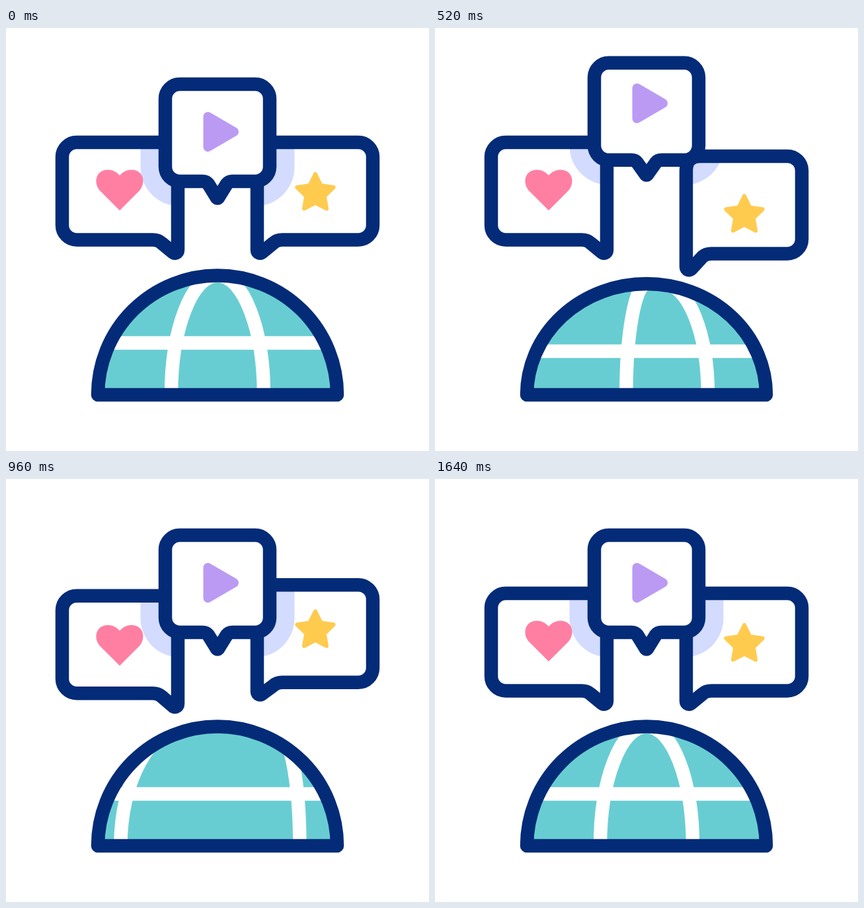
An HTML page with a canvas that plays this animation: 640x640 px, repeating every 2 s.

```html
<!DOCTYPE html>
<html lang="en">
<head>
<meta charset="utf-8">
<title>Global media</title>
<style>
  html, body { margin: 0; width: 100%; height: 100%; overflow: hidden; background: #fff; }
  canvas { display: block; width: 640px; height: 640px; }
</style>
</head>
<body>
<canvas id="stage" width="640" height="640"></canvas>
<script>
const ctx = document.getElementById('stage').getContext('2d');
const LOOP = 2000;
const LINE = 20.5;
const NAVY = '#042b77', TEAL = '#68cdd2', SHADE = '#d3dcff';
const PINK = '#ff7fa3', YELLOW = '#ffcb4f', VIOLET = '#bb9af3';

// Keys are [time, value] pairs, eased in and out between neighbours.
function track(keys, t) {
  if (t <= keys[0][0]) return keys[0][1];
  for (let i = 1; i < keys.length; i++) {
    const [t0, v0] = keys[i - 1], [t1, v1] = keys[i];
    if (t < t1) {
      const p = (t - t0) / (t1 - t0);
      return v0 + (v1 - v0) * p * p * (3 - 2 * p);
    }
  }
  return keys[keys.length - 1][1];
}

// Smooth curve through all keys, at rest at both ends.
function spline(keys, t) {
  const last = keys.length - 1;
  if (t <= keys[0][0]) return keys[0][1];
  if (t >= keys[last][0]) return keys[last][1];
  const slope = i => i === 0 || i === last ? 0
    : (keys[i + 1][1] - keys[i - 1][1]) / (keys[i + 1][0] - keys[i - 1][0]);
  let i = 0;
  while (t >= keys[i + 1][0]) i++;
  const [t0, v0] = keys[i], [t1, v1] = keys[i + 1];
  const d = t1 - t0, p = (t - t0) / d, q = 1 - p;
  return v0 * (1 + 2 * p) * q * q + v1 * p * p * (3 - 2 * p)
    + d * p * q * (slope(i) * q - slope(i + 1) * p);
}

const SPIN = [[320, 0], [520, 39], [680, 91], [960, 194], [1320, 352], [1640, 411]];
const SQUASH = [[0, 0], [280, -10.5], [320, -10.5], [520, 12.5], [680, 0]];

// Each bubble dips, hops and settles; tail and icon travel further than the body.
const hops = {
  center: { times: [0, 280, 320, 560, 800], body: [32, -37], tail: [39, -40.5], icon: [48, -50] },
  right: { times: [360, 600, 600, 840, 1080], body: [28, -26], tail: [34, -29], icon: [44.5, -42] },
  left: { times: [600, 840, 840, 1120, 1400], body: [22, -24], tail: [24.5, -26.5], icon: [32, -32] }
};

function hop(name, t) {
  const { times, ...parts } = hops[name];
  const pose = {};
  for (const key in parts) {
    const [down, up] = parts[key];
    const values = [0, down, down, up, 0];
    pose[key] = track(times.map((time, i) => [time, values[i]]), t);
  }
  return pose;
}

function sidePath({ body, tail }) {
  const top = 173 + body, base = 320.5 + body;
  return new Path2D(`M107 ${top} H238 Q260 ${top} 260 ${top + 22} V${336 + tail}
    C260 ${341 + tail} 255 ${342 + tail} 252 ${339 + tail}
    L235 ${325 + body} Q230 ${base} 222 ${base} H107
    A22 22 0 0 1 85 ${base - 22} V${top + 22} A22 22 0 0 1 107 ${top} Z`);
}

function centerPath({ body, tail }) {
  const top = 85 + body, base = 232 + body, tip = 257.5 + tail;
  return new Path2D(`M263 ${top} H377 A22 22 0 0 1 399 ${top + 22} V${base - 22}
    A22 22 0 0 1 377 ${base} H343 Q337 ${base} 334 ${base + 4}
    L321 ${tip - 0.5} Q320 ${tip + 0.5} 319 ${tip - 0.5}
    L306 ${base + 4} Q303 ${base} 297 ${base} H263
    A22 22 0 0 1 241 ${base - 22} V${top + 22} A22 22 0 0 1 263 ${top} Z`);
}

const heart = new Path2D(`M172 276 L143.5 247.5 C132 237 134 215 154 214.5
  C163 214.5 168 219 172 223 C176 219 181 214.5 190 214.5
  C210 215 212 237 200.5 247.5 Z`);
const play = new Path2D('M305.5 134 L345 157 L305.5 180 Z');
const star = new Path2D();
for (let i = 0; i < 10; i++) {
  const r = i % 2 ? 14.5 : 29, a = i * Math.PI / 5;
  star.lineTo(468 + r * Math.sin(a), 250 - r * Math.cos(a));
}
star.closePath();

function fill(path, color) {
  ctx.fillStyle = color;
  ctx.fill(path);
}

function stroke(path, color, width = LINE) {
  ctx.strokeStyle = color;
  ctx.lineWidth = width;
  ctx.stroke(path);
}

function icon(path, color, dy, round) {
  ctx.save();
  ctx.translate(0, dy);
  fill(path, color);
  if (round) stroke(path, color, round);
  ctx.restore();
}

function globe(t) {
  const dy = track(SQUASH, t);
  const top = 374.5 + dy, h = 555 - top;
  const dome = new Path2D(`M139 555 A181 ${h} 0 0 1 501 555 Z`);
  fill(dome, TEAL);

  ctx.save();
  ctx.clip(dome);
  stroke(new Path2D(`M139 ${476.5 + dy} H501`), '#fff');
  const meridian = (foot, apex) => stroke(new Path2D(
    `M${320 + foot} 555 C${320 + foot} ${555 - 0.552 * h}
      ${320 + apex + 0.552 * (foot - apex)} ${top} ${320 + apex} ${top}`), '#fff');
  const out = spline(SPIN, t), rest = 411 - out;
  meridian(-70 + out, Math.max(0, out - 40) * 0.57);
  meridian(70 + out * 0.585, out * 0.65);
  meridian(70 - rest, rest * -0.21);
  meridian(-70 - rest * 0.66, rest * -0.37);
  ctx.restore();

  stroke(dome, NAVY);
}

function side(pose, shadeDy, mirrored) {
  const path = sidePath(pose);
  ctx.save();
  if (mirrored) ctx.transform(-1, 0, 0, 1, 640, 0);
  fill(path, '#fff');
  ctx.save();
  ctx.clip(path);
  const shade = new Path2D();
  shade.roundRect(203.5, 47 + shadeDy, 233, 222.5, 59);
  fill(shade, SHADE);
  ctx.restore();
  stroke(path, NAVY);
  ctx.restore();
}

function draw(t) {
  const center = hop('center', t), left = hop('left', t), right = hop('right', t);
  ctx.clearRect(0, 0, 640, 640);
  ctx.lineJoin = 'round';
  globe(t);
  side(left, center.body, false);
  icon(heart, PINK, left.icon);
  side(right, center.body, true);
  icon(star, YELLOW, right.icon, 6);
  const path = centerPath(center);
  fill(path, '#fff');
  stroke(path, NAVY);
  icon(play, VIOLET, center.icon, 14);
}

function tick() {
  draw(performance.now() % LOOP);
  requestAnimationFrame(tick);
}
tick();
</script>
</body>
</html>
```
